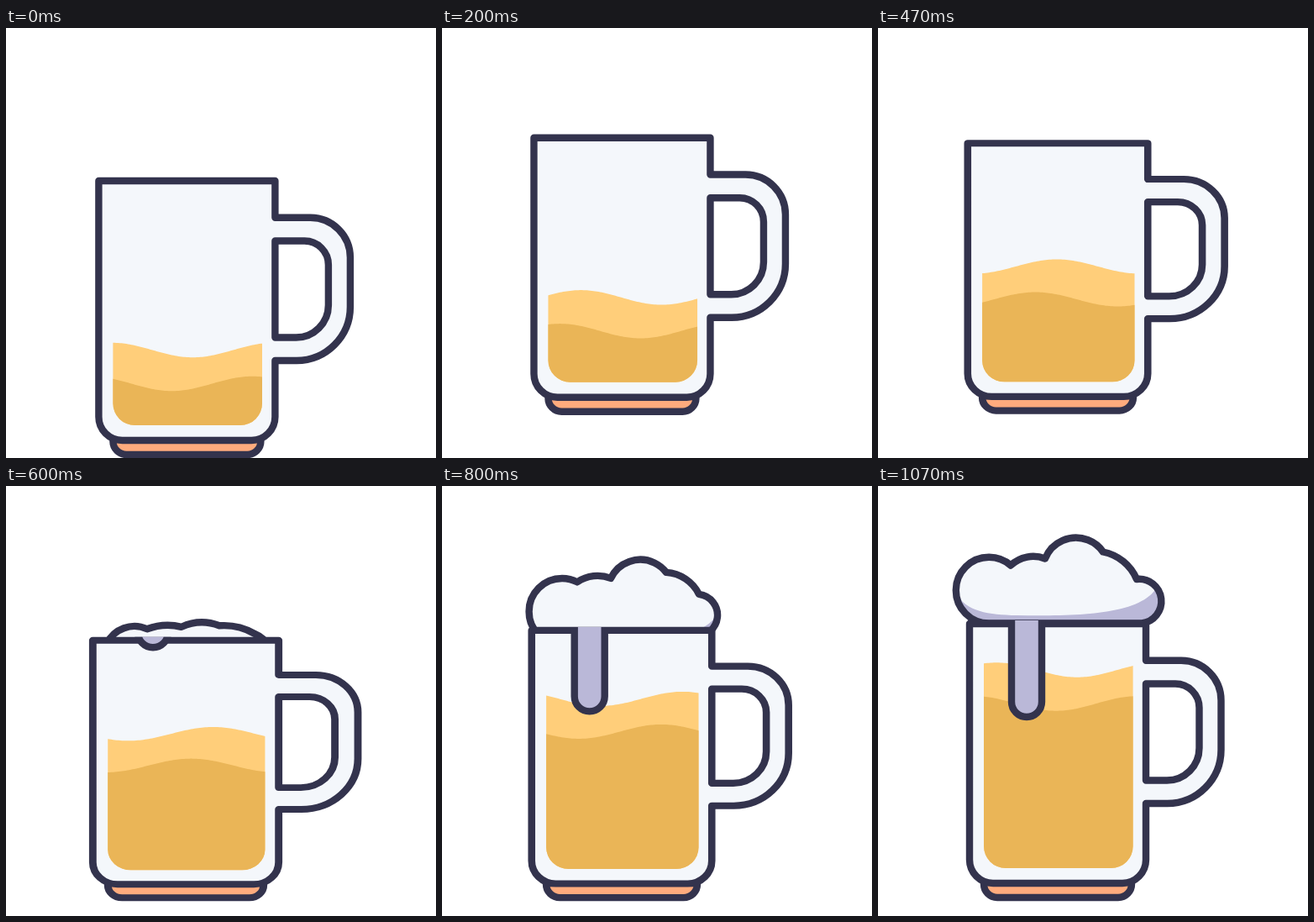
An HTML page with a canvas that plays this animation: 512 by 512 pixels, repeating every 1.1 s.

```html
<!DOCTYPE html>
<html lang="en">
<head>
<meta charset="utf-8">
<title>Filling mug</title>
<style>
html, body { margin: 0; width: 100%; height: 100%; overflow: hidden; background: #fff; }
canvas { display: block; width: 512px; height: 512px; }
</style>
</head>
<body>
<canvas id="stage" width="512" height="512"></canvas>
<script>
const ctx = document.getElementById('stage').getContext('2d');
const LOOP = 1100;
const BEATS = [0, 70, 100, 130, 170]; // five poses in every 200 ms
const INK = '#33334d', GLASS = '#f4f7fb', LIGHT = '#ffce7a', DARK = '#eab557';
const BASE = '#ffab7d', SHADE = '#bab8d8';
const CX = 214, FLOOR = 440, RIM = 110;

const clamp = v => Math.min(1, Math.max(0, v));
const smooth = (a, b, n) => { const p = clamp((n - a) / (b - a)); return p * p * (3 - 2 * p); };

// Monotone cubic through [step, value] keys.
function track(keys, n) {
  const last = keys.length - 1;
  if (n <= keys[0][0]) return keys[0][1];
  if (n >= keys[last][0]) return keys[last][1];
  const slope = i => (keys[i + 1][1] - keys[i][1]) / (keys[i + 1][0] - keys[i][0]);
  const tangent = i => {
    if (i === 0 || i === last) return 0;
    const a = slope(i - 1), b = slope(i);
    return a * b > 0 ? 2 * a * b / (a + b) : 0;
  };
  let i = 0;
  while (n > keys[i + 1][0]) i++;
  const [x0, y0] = keys[i], [x1, y1] = keys[i + 1];
  const h = x1 - x0, p = (n - x0) / h, q = 1 - p;
  return y0 * q * q * (1 + 2 * p) + y1 * p * p * (3 - 2 * p)
    + h * p * q * (tangent(i) * q - tangent(i + 1) * p);
}

const mug = new Path2D(
  'M109 110H319V153.8H361A47.5 47.5 0 0 1 408.5 201.3V260A64 64 0 0 1 344.5 324H319V391' +
  'A28 28 0 0 1 291 419H137A28 28 0 0 1 109 391Z' +
  'M319 181.5H354A28.5 28.5 0 0 1 382.5 210V258A38.5 38.5 0 0 1 344 296.5H319Z');
const foot = new Path2D('M126 415V420A16 16 0 0 0 142 436H286A16 16 0 0 0 302 420V415Z');
const beerBox = new Path2D('M126 120H303.6V375A26 26 0 0 1 277.6 401H152A26 26 0 0 1 126 375Z');

// Foam knots: x, height against the rim, bulge of the arc to the next knot.
const FOAM_STEPS = [15, 20, 26];
const FOAM = [
  [[120, 4, .41], [168, -13.5, .15], [209, -16, .2], [254, -17.5, .15], [296, -8, .2], [314, 10, 0]],
  [[143, 17, 1.27], [161, -57.5, .25], [201, -62, .56], [267, -69, .27], [306, -43, .94], [303, 7, 0]],
  [[132, -.5, 1.44], [158, -69.5, .29], [199, -77.5, .6], [268, -85.5, .25], [308, -53, 1.06], [311, -.5, 0]]
];
const foamShade = new Path2D('M90 -42C102 -14 130 -11 165 -10C240 -9 322 -10 335 -50L350 60H70Z');

function bulgeArc(path, [x0, y0, bulge], [x1, y1]) {
  const dx = x1 - x0, dy = y1 - y0, half = 2 * Math.atan(bulge);
  const k = .5 / Math.tan(half);
  const cx = (x0 + x1) / 2 - dy * k, cy = (y0 + y1) / 2 + dx * k;
  path.arc(cx, cy, Math.hypot(x0 - cx, y0 - cy),
    Math.atan2(y0 - cy, x0 - cx), Math.atan2(y1 - cy, x1 - cx));
}

function wave(level, crest, color) {
  ctx.beginPath();
  ctx.moveTo(120, 410);
  for (let x = 120; x <= 310; x += 2)
    ctx.lineTo(x, level - 8.7 * Math.cos((x - crest) * 2 * Math.PI / 192));
  ctx.lineTo(310, 410);
  ctx.fillStyle = color;
  ctx.fill();
}

function clipRows(top, bottom) {
  ctx.beginPath();
  ctx.rect(0, top, 512, bottom - top);
  ctx.clip();
}

function drawFoam(n, rim) {
  if (n < 13) return;
  const knots = FOAM[0].map((knot, i) => knot.map((_, j) =>
    track(FOAM_STEPS.map((s, k) => [s, FOAM[k][i][j]]), n)));
  const outline = new Path2D();
  for (let i = 0; i < knots.length - 1; i++) bulgeArc(outline, knots[i], knots[i + 1]);
  outline.closePath();
  const low = track([[15, 24], [20, 24], [26, 0]], n);

  ctx.save();
  clipRows(0, rim + 4);
  ctx.translate(0, rim + 22 * (1 - smooth(12, 15, n)));
  ctx.fillStyle = GLASS;
  ctx.fill(outline);
  ctx.save();
  ctx.clip(outline);
  ctx.translate(-low / 6, low);
  ctx.fillStyle = SHADE;
  ctx.fill(foamShade);
  ctx.restore();
  ctx.stroke(outline);
  ctx.restore();
}

function drawMug(n, base, dx, sx, sy) {
  ctx.save();
  ctx.translate(CX + dx, base);
  ctx.scale(sx, sy);
  ctx.translate(-CX, -FLOOR);
  ctx.fillStyle = BASE;
  ctx.fill(foot);
  ctx.stroke(foot);
  ctx.fillStyle = GLASS;
  ctx.fill(mug, 'evenodd');
  ctx.stroke(mug);
  ctx.clip(beerBox);
  const level = track([[0, 311.5], [3, 307.5], [7, 289], [15, 228.5], [20, 193.5], [27, 164]], n);
  const crest = 125 + 8 * n;
  wave(level, crest, LIGHT);
  wave(level + 40, crest - 25, DARK);
  ctx.restore();
}

function drawDrip(n, rim) {
  const depth = track([[11, -10], [15, 8.5], [20, 96.5], [26, 111]], n);
  if (depth <= 0) return;
  const x = track([[15, 175], [20, 175.7], [26, 177]], n);
  const y = rim + depth - 18;
  ctx.save();
  clipRows(rim - 4, 512);
  ctx.beginPath();
  ctx.moveTo(x - 18, Math.min(y, rim) - 30);
  ctx.lineTo(x - 18, y);
  ctx.arc(x, y, 18, Math.PI, 0, true);
  ctx.lineTo(x + 18, Math.min(y, rim) - 30);
  ctx.fillStyle = SHADE;
  ctx.fill();
  ctx.stroke();
  ctx.restore();
}

function draw(n) {
  const rise = smooth(0, 8, n), fall = smooth(8, 15, n);
  const squash = fall - smooth(15, 23.8, n);
  const base = 512 - 75 * rise + 57 * fall;
  const sx = 1 + .054 * squash, sy = 1 - .06 * squash;
  const rim = base + (RIM - FLOOR) * sy;
  ctx.fillStyle = '#fff';
  ctx.fillRect(0, 0, 512, 512);
  ctx.strokeStyle = INK;
  ctx.lineWidth = 8.4;
  ctx.lineJoin = 'round';
  drawFoam(n, rim);
  drawMug(n, base, 1.4 * (1 - rise), sx, sy);
  drawDrip(n, rim);
}

function tick() {
  const t = performance.now() % LOOP;
  const beat = BEATS.filter(b => b <= t % 200).length - 1;
  draw(Math.floor(t / 200) * BEATS.length + beat);
  requestAnimationFrame(tick);
}
tick();
</script>
</body>
</html>
```
